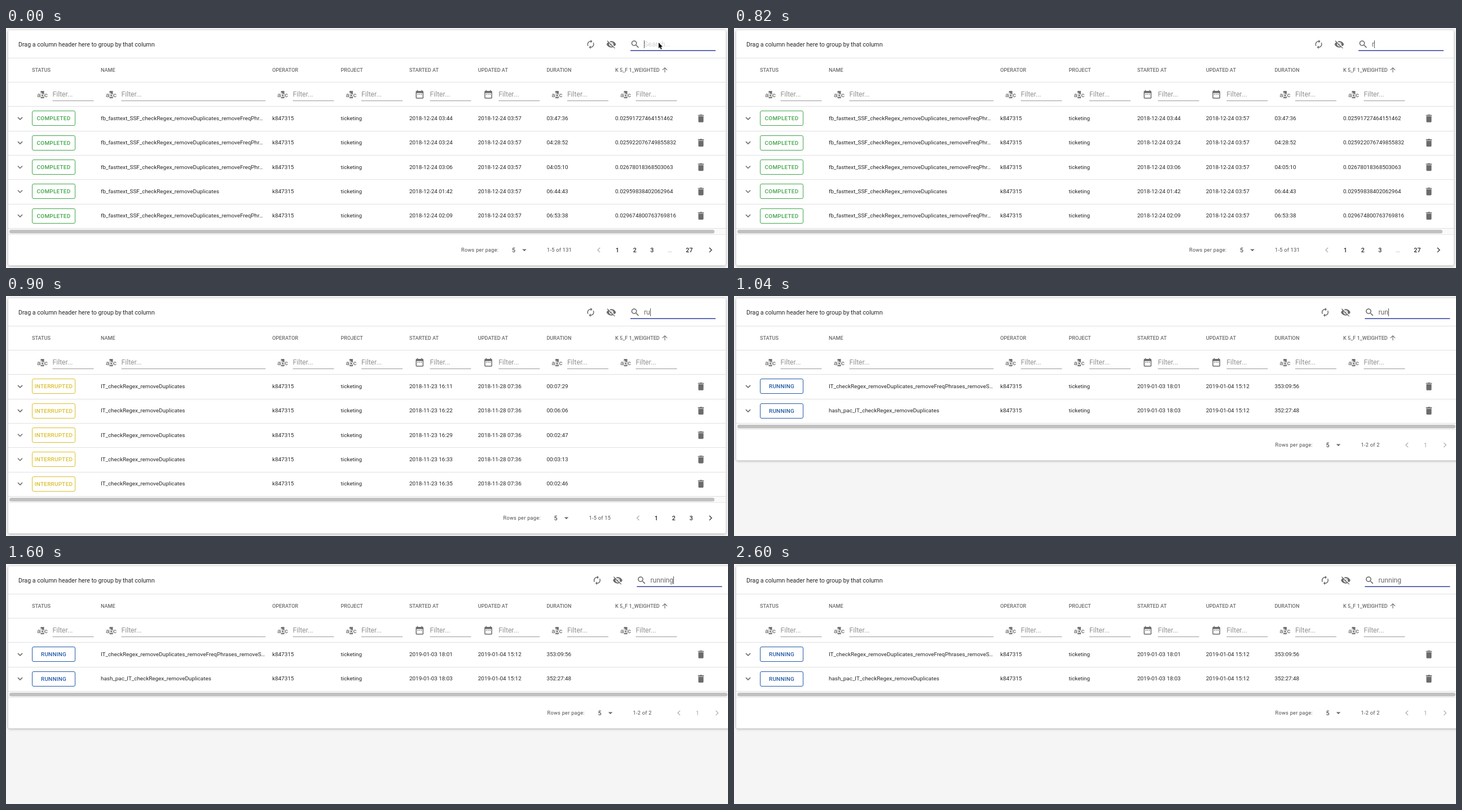
An HTML page with a canvas for the animation above (2.66 s loop, 1280 by 427 pixels).

```html
<!DOCTYPE html>
<html lang="en">
<head>
<meta charset="utf-8">
<title>Run table search</title>
<style>
  html, body { margin: 0; width: 100%; height: 100%; overflow: hidden; background: #f5f5f5; }
  canvas { display: block; }
</style>
</head>
<body>
<canvas id="stage" width="1280" height="427"></canvas>
<script>
const ctx = document.getElementById('stage').getContext('2d');
const LOOP = 2660, ROW = 43.3, SCALE = 0.76;
const INK = 'rgba(0,0,0,.85)', GRAY = 'rgba(0,0,0,.58)', FAINT = 'rgba(0,0,0,.28)', LINE = '#e0e0e0';

const icons = {
  refresh: 'M12 6v3l4-4-4-4v3c-4.42 0-8 3.58-8 8 0 1.57.46 3.03 1.24 4.26L6.7 14.8c-.45-.83-.7-1.79-.7-2.8 0-3.31 2.69-6 6-6zm6.76 1.74L17.3 9.2c.44.84.7 1.79.7 2.8 0 3.31-2.69 6-6 6v-3l-4 4 4 4v-3c4.42 0 8-3.58 8-8 0-1.57-.46-3.03-1.24-4.26z',
  hidden: 'M12 7c2.76 0 5 2.24 5 5 0 .65-.13 1.26-.36 1.83l2.92 2.92c1.51-1.26 2.7-2.89 3.43-4.75-1.73-4.39-6-7.5-11-7.5-1.4 0-2.74.25-3.98.7l2.16 2.16C10.74 7.13 11.35 7 12 7zM2 4.27l2.74 2.74C3.08 8.3 1.78 10.02 1 12c1.73 4.39 6 7.5 11 7.5 1.55 0 3.03-.3 4.38-.84L19.73 22 21 20.73 3.27 3zM7.53 9.8l1.55 1.55c-.05.21-.08.43-.08.65 0 1.66 1.34 3 3 3 .22 0 .44-.03.65-.08l1.55 1.55c-.67.33-1.41.53-2.2.53-2.76 0-5-2.24-5-5 0-.79.2-1.53.53-2.2zm4.31-.78l3.15 3.15.02-.16c0-1.66-1.34-3-3-3z',
  search: 'M15.5 14h-.79l-.28-.27C15.41 12.59 16 11.11 16 9.5 16 5.91 13.09 3 9.5 3S3 5.91 3 9.5 5.91 16 9.5 16c1.61 0 3.09-.59 4.23-1.57l.27.28v.79l5 4.99L20.49 19zm-6 0C7.01 14 5 11.99 5 9.5S7.01 5 9.5 5 14 7.01 14 9.5 11.99 14 9.5 14z',
  expand: 'M16.59 8.59L12 13.17 7.41 8.59 6 10l6 6 6-6z',
  trash: 'M6 19c0 1.1.9 2 2 2h8c1.1 0 2-.9 2-2V7H6zM19 4h-3.5l-1-1h-5l-1 1H5v2h14z',
  date: 'M9 11H7v2h2zm4 0h-2v2h2zm4 0h-2v2h2zm2-7h-1V2h-2v2H8V2H6v2H5c-1.11 0-2 .9-2 2v14c0 1.1.89 2 2 2h14c1.1 0 2-.9 2-2V6c0-1.1-.9-2-2-2zm0 16H5V9h14z',
  up: 'M4 12l1.41 1.41L11 7.83V20h2V7.83l5.58 5.59L20 12l-8-8z',
  drop: 'M7 10l5 5 5-5z',
  prev: 'M15.41 7.41L14 6l-6 6 6 6 1.41-1.41L10.83 12z',
  next: 'M10 6L8.59 7.41 13.17 12l-4.58 4.59L10 18l6-6z'
};
for (const name in icons) icons[name] = new Path2D(icons[name]);

const columns = [
  [46, 'STATUS'], [168, 'NAME'], [472, 'OPERATOR'], [593.5, 'PROJECT'],
  [715, 'STARTED AT'], [836.8, 'UPDATED AT'], [958.4, 'DURATION'], [1080, 'K 5_F 1_WEIGHTED']
];

// Row data: name, start, duration, score
const base = 'checkRegex_removeDuplicates';
const fast = 'fb_fasttext_SSF_' + base, freq = fast + '_removeFreqPhr…';
const views = {
  all: {
    status: 'COMPLETED', color: '#3fa648', updated: '2018-12-24 03:57',
    rows: [
      [freq, '2018-12-24 03:44', '03:47:36', '0.02591727464151462'],
      [freq, '2018-12-24 03:24', '04:28:52', '0.025922076749855832'],
      [freq, '2018-12-24 03:06', '04:05:10', '0.02678018368503063'],
      [fast, '2018-12-24 01:42', '06:44:43', '0.02959838402062964'],
      [freq, '2018-12-24 02:09', '06:53:38', '0.029674800763769816']
    ],
    shift: 0, thumbEnd: 1256, footer: 807, count: '1-5 of 131', prev: 1051,
    pages: [['1', 1084], ['2', 1115], ['3', 1145.5], ['…', 1177], ['27', 1211.5]]
  },
  interrupted: {
    status: 'INTERRUPTED', color: '#dabf2c', updated: '2018-11-28 07:36',
    rows: [['11', '07:29'], ['22', '06:06'], ['29', '02:47'], ['33', '03:13'], ['35', '02:46']]
      .map(([minute, time]) => ['IT_' + base, '2018-11-23 16:' + minute, '00:' + time, '']),
    shift: 0, thumbEnd: 1256, footer: 881.5, count: '1-5 of 15', prev: 1120.5,
    pages: [['1', 1153], ['2', 1184], ['3', 1215]]
  },
  running: {
    status: 'RUNNING', color: '#2159a6', updated: '2019-01-04 15:12',
    rows: [
      ['IT_' + base + '_removeFreqPhrases_removeS…', '2019-01-03 18:01', '353:09:56', ''],
      ['hash_pac_IT_' + base, '2019-01-03 18:03', '352:27:48', '']
    ],
    shift: 11.4, thumbEnd: 1279, footer: 959.5, count: '1-2 of 2', prev: 1193, pages: [['1', 1226]]
  }
};

// Text is given at its 1x interface size and centred on cap height
function text(str, x, y, { size = 13, color = INK, weight = 400, spacing = 0, align = 'left' } = {}) {
  const px = size * SCALE;
  ctx.font = `${weight} ${px}px Roboto, sans-serif`;
  ctx.letterSpacing = spacing * px + 'px';
  ctx.textAlign = align;
  ctx.fillStyle = color;
  ctx.fillText(str, x, y + px * 0.355);
  return ctx.measureText(str).width;
}

function icon(name, x, y, color = GRAY, size = 24) {
  const k = size / 24 * SCALE;
  ctx.save();
  ctx.translate(x, y);
  ctx.scale(k, k);
  ctx.translate(-12, -12);
  ctx.fillStyle = color;
  ctx.fill(icons[name]);
  ctx.restore();
}

function rect(x, y, w, h, color) {
  ctx.fillStyle = color;
  ctx.fillRect(x, y, w, h);
}

function box(x, y, w, h, r) {
  ctx.beginPath();
  ctx.roundRect(x, y, w, h, r);
}

function card(width, bottom) {
  ctx.save();
  ctx.shadowColor = 'rgba(0,0,0,.32)';
  ctx.shadowBlur = 4;
  ctx.shadowOffsetY = 1;
  ctx.fillStyle = '#fff';
  box(4, 4, width, bottom - 4, 3);
  ctx.fill();
  ctx.restore();
}

function toolbar(shift, query, caretOn) {
  text('Drag a column header here to group by that column', 22, 29, { size: 14 });
  icon('refresh', 1036.5 + shift, 29);
  icon('hidden', 1073 + shift, 29);
  icon('search', 1115.5 + shift, 29);
  rect(1107 + shift, 39.5, 151, 1.5, '#303f9f');
  const x = 1131 + shift;
  if (!query) text('Search...', x, 29, { size: 16, color: 'rgba(0,0,0,.17)' });
  const width = query ? text(query, x, 29, { size: 16, color: '#6a6a6a' }) : 0;
  if (caretOn) rect(Math.round(x + width), 22, 1, 14, '#555');
}

function header() {
  columns.forEach(([x, label], i) => {
    const isDate = i === 4 || i === 5;
    text(label, x, 74.4, { size: 12, color: GRAY, weight: 500 });
    if (isDate) icon('date', x + 18.3, 118);
    else {
      const mark = { size: 15, color: '#757575', weight: 500, align: 'center' };
      rect(x + 15.5, 112, 6, 13, '#757575');
      text('a', x + 12, 119, mark);
      text('b', x + 18.5, 119, { ...mark, color: '#fff' });
      text('c', x + 25, 119, mark);
    }
    text('Filter...', x + 36.5, 118, { size: 16, color: 'rgba(0,0,0,.43)' });
    rect(x + 36.5, 129, i === 1 ? 255.5 : 73, 1, '#999');
  });
  icon('up', 1168, 74.5, GRAY, 18);
}

function tableRow(view, [name, started, duration, score], y) {
  icon('expand', 25, y);
  ctx.strokeStyle = view.color;
  ctx.lineWidth = 1;
  box(46.5, Math.round(y - 13.5) + 0.5, 76, 26, 2.5);
  ctx.stroke();
  text(view.status, 84.5, y, { color: view.color, weight: 500, spacing: 0.0286, align: 'center' });
  [name, 'k847315', 'ticketing', started, view.updated, duration, score]
    .forEach((value, i) => text(value, columns[i + 1][0], y - 0.3));
  icon('trash', 1232, y);
}

function footer(view, y) {
  const caption = { size: 12, color: 'rgba(0,0,0,.7)', spacing: 0.0333 };
  const x = view.footer, single = view.pages.length === 1;
  text('Rows per page:', x, y, caption);
  text('5', x + 93, y, { size: 14, align: 'center' });
  icon('drop', x + 112, y);
  text(view.count, x + 152, y, caption);
  icon('prev', view.prev, y, FAINT);
  for (const [label, px] of view.pages) {
    const color = single || label === '…' ? FAINT : INK;
    text(label, px, y, { size: 14, weight: 500, spacing: 0.0286, align: 'center', color });
  }
  icon('next', 1249 + view.shift, y, single ? FAINT : 'rgba(0,0,0,.7)');
}

function pointer(x, y) {
  ctx.beginPath();
  [[0, 0], [0, 10], [2.3, 8], [4, 12], [5.6, 11.2], [4, 7.5], [7, 7.2]]
    .forEach(([dx, dy]) => ctx.lineTo(x + dx, y + dy));
  ctx.closePath();
  ctx.strokeStyle = '#fff';
  ctx.lineWidth = 1.5;
  ctx.stroke();
  ctx.fillStyle = '#000';
  ctx.fill();
}

const keyTimes = [580, 900, 1040, 1060, 1080, 1100, 1120];
const caretOff = [[40, 520], [1620, 2120], [2600, LOOP]];

function draw(t) {
  const query = 'running'.slice(0, keyTimes.filter(k => t >= k).length);
  const caretOn = !caretOff.some(([from, to]) => t >= from && t < to);
  const view = query.length < 2 ? views.all : query.length < 3 ? views.interrupted : views.running;
  const width = 1272 + view.shift, end = 139.4 + ROW * view.rows.length;

  rect(0, 0, 1280, 427, '#f5f5f5');
  card(width, end + 66.5);
  toolbar(view.shift, query, caretOn);
  header();
  for (const y of [53, 96, 139]) rect(4, y, width, 1, LINE);
  view.rows.forEach((row, i) => {
    const top = 139.4 + ROW * i;
    tableRow(view, row, top + 21.5);
    rect(4, Math.round(top + ROW), width, 1, LINE);
  });

  const bar = Math.round(end);
  rect(4, bar + 1, width, 10, '#fafafa');
  rect(4, bar + 11, width, 1, '#e8e8e8');
  ctx.fillStyle = '#c1c1c1';
  box(6, bar + 3, view.thumbEnd - 6, 6.5, 3.25);
  ctx.fill();
  footer(view, end + 39);
  if (!query) pointer(1157, 26);
}

function tick() {
  draw(performance.now() % LOOP);
  requestAnimationFrame(tick);
}
tick();
</script>
</body>
</html>
```
